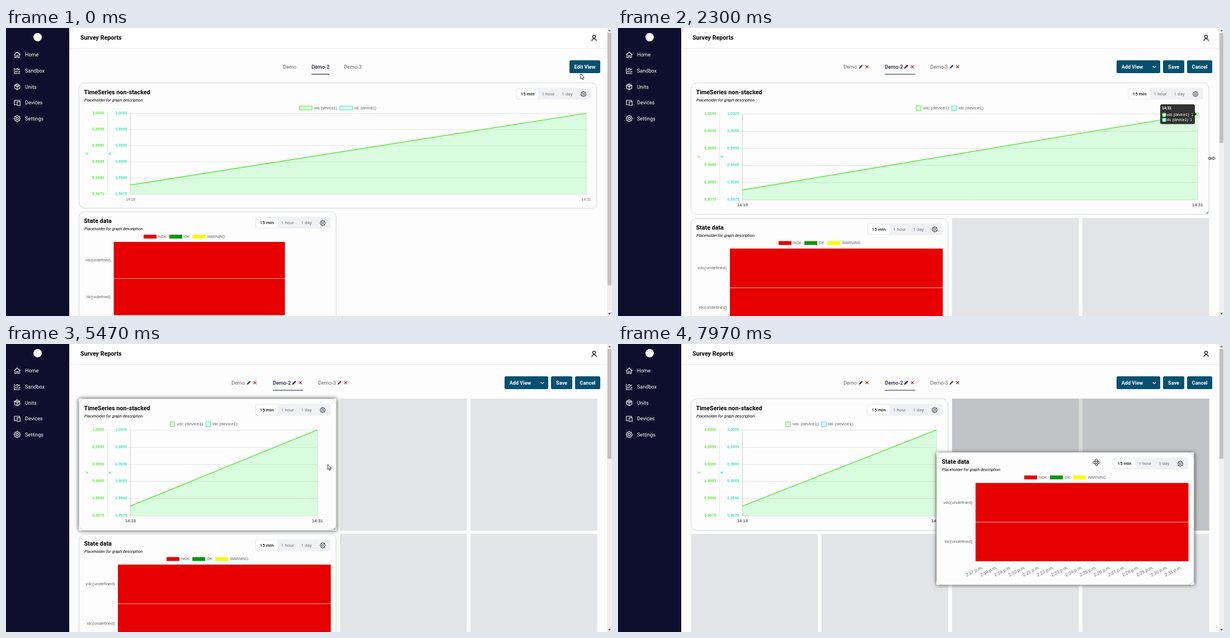
These frames come from a looping animation (1083x517 px, 8 s). An HTML page with a canvas:

```html
<!DOCTYPE html>
<html lang="en">
<head>
<meta charset="utf-8">
<title>Dashboard editing</title>
<style>
  html, body { margin: 0; width: 100%; height: 100%; overflow: hidden; background: #fdfdfd; }
  canvas { display: block; }
</style>
</head>
<body>
<canvas id="stage" width="1083" height="517"></canvas>
<script>
const c = document.getElementById('stage').getContext('2d');
const LOOP = 8000, EDIT = 800, LOAD = 905, HOVER = 1750;
const GRAB = 3450, RELEASE = 5250, LIFT = 6850;
const UI = 'Roboto, sans-serif', CHART = '"Liberation Sans", Arial, sans-serif';
const NAVY = '#0e0f2c', BLUE = '#07506f', PAGE = '#fdfdfd';
const GREEN = '#6ce552', TEAL = '#4de0c6', RED = '#e60000';
const COL = 233.2, ROW = 243, LEFT = 130.5, TOP = 98.5;

const clamp = v => Math.max(0, Math.min(1, v));
const mix = (a, b, u) => a + (b - a) * u;
const smooth = u => { u = clamp(u); return u * u * (3 - 2 * u); };
const ramp = (t, a, b) => smooth((t - a) / (b - a));
const outQuart = u => 1 - (1 - clamp(u)) ** 4;

function text(s, x, y, size, color, { weight = '', font = UI, align = 'left' } = {}) {
  c.font = `${weight} ${size}px ${font}`;
  c.fillStyle = color;
  c.textAlign = align;
  c.textBaseline = 'middle';
  c.fillText(s, x, y);
}
function box(x, y, w, h, fill, r = 0, stroke) {
  c.beginPath();
  c.roundRect(x, y, w, h, r);
  if (fill) { c.fillStyle = fill; c.fill(); }
  if (stroke) { c.strokeStyle = stroke; c.lineWidth = 1; c.stroke(); }
}
function line(color, width, ...p) {
  c.beginPath();
  for (let i = 0; i < p.length; i += 2) c.lineTo(p[i], p[i + 1]);
  c.strokeStyle = color;
  c.lineWidth = width;
  c.stroke();
}
function shape(d, x, y, stroke, fill, width = 1.2) {
  c.save();
  c.translate(x, y);
  const p = new Path2D(d);
  if (fill) { c.fillStyle = fill; c.fill(p); }
  if (stroke) { c.strokeStyle = stroke; c.lineWidth = width; c.stroke(p); }
  c.restore();
}
function gear(x, y, r, color) {
  c.beginPath();
  for (let i = 0; i <= 48; i++) {
    const a = i / 48 * 2 * Math.PI, q = r * (0.9 + 0.12 * Math.cos(8 * a));
    c.lineTo(x + q * Math.cos(a), y + q * Math.sin(a));
  }
  c.moveTo(x + r * 0.38, y);
  c.arc(x, y, r * 0.38, 0, 7);
  c.strokeStyle = color;
  c.lineWidth = 1.1;
  c.stroke();
}

const ICONS = {
  Home: 'M-5.5 0L0-5L5.5 0M-4-1V5H-1.3V1.5H1.3V5H4V-1',
  Sandbox: 'M-5-5V5H5.5M-2.5 3V0M0 3V-1M2.5 3V1M4.5 3V0M-3-2L0-4L2-1.5L5-3',
  Units: 'M0-5.3L4.7-2.7V2.7L0 5.3L-4.7 2.7V-2.7ZM-4.7-2.7L0 0L4.7-2.7M0 0V5.3M-2.4-4L2.4-1.3',
  Devices: 'M-1 3.5H-5V-4.5H4V-2.5M0-2H5.3V4.7H0Z',
  Settings: ''
};

function frame(edit) {
  box(0, 0, 1083, 517, PAGE);
  box(113, 0, 961, 36, '#fff');
  line('#e9e9ef', 1, 113, 36.5, 1074, 36.5);
  text('Survey Reports', 133, 17.5, 10.7, '#000', { weight: 'bold' });
  shape('M-3.8 5.5V4.2Q-3.8 1.3 0 1.3Q3.8 1.3 3.8 4.2V5.5M2.5-2.6A2.5 2.5 0 1 1-2.5-2.6A2.5 2.5 0 1 1 2.5-2.6', 1051, 18, '#111', null, 1.3);

  box(0, 0, 113, 517, NAVY);
  c.beginPath(); c.arc(56.5, 16.5, 7.5, 0, 7); c.fillStyle = '#fff'; c.fill();
  Object.entries(ICONS).forEach(([name, d], i) => {
    const y = 48 + i * 28.75;
    text(name, 34, y + 0.5, 9.05, '#fff');
    if (d) shape(d, 20, y, '#fff', null, 1.1); else gear(20, y - 0.5, 5.5, '#fff');
  });

  box(1074, 0, 9, 517, '#f1f1f1');
  box(1075, 9, 7, edit ? 197 : 453, '#c1c1c1');
  shape('M-2.5 1.5L0-1.5L2.5 1.5Z', 1078.5, 4.5, null, '#777');
  shape('M-2.5-1.5L0 1.5L2.5-1.5Z', 1078.5, 513, null, '#555');
}

function button(label, x, w, dark, tx = x + w / 2) {
  box(x, 58, w, 23, dark ? NAVY : BLUE, 2.5);
  text(label, tx, 70, 9.1, '#fff', { weight: 'bold', align: 'center' });
}
function menu(edit, m) {
  const xs = edit ? [403, 477, 558] : [495, 546, 604];
  ['Demo', 'Demo-2', 'Demo-3'].forEach((name, i) => {
    const on = i === 1, x = xs[i], ink = on ? '#1b1b4b' : '#666';
    text(name, x, 70, 9.1, ink, { weight: on ? '500' : '' });
    if (!edit) return;
    const px = x + (i ? 38 : 31);
    shape('M-3.5 3.5L-3 1.2L1.7-3.5L3.5-1.7L-1.2 3Z', px, 69.5, null, on ? '#1b1b4b' : '#444');
    shape('M-2.5-2.5L2.5 2.5M2.5-2.5L-2.5 2.5', px + 11, 69.5, '#d8232f', null, 1.2);
  });
  line('#1b1b4b', 1.2, xs[1], 83, xs[1] + (edit ? 54 : 32), 83);
  const over = (x, w) => m.x > x && m.x < x + w && m.y > 58 && m.y < 81;
  if (!edit) return button('Edit View', 1007, 55, over(1007, 55));
  button('Add View', 891, 78, false, 919);
  shape('M-2.8-1.4L0 1.4L2.8-1.4', 958.5, 70, '#fff', null, 1.3);
  button('Save', 974, 38, over(974, 38));
  button('Cancel', 1017, 45, over(1017, 45));
}

function card(x, y, w, h, title, lifted) {
  c.save();
  if (lifted) { c.shadowColor = 'rgba(0,0,0,.75)'; c.shadowBlur = 7; }
  box(x - 0.5, y - 0.5, w + 1, h + 1, PAGE);
  c.restore();
  box(x, y, w, h, PAGE, 10, '#d3d5da');
  text(title, x + 9, y + 17, 10.75, '#000', { weight: 'bold' });
  text('Placeholder for graph description', x + 9.5, y + 31, 7.25, '#000', { weight: 'italic' });
  const r = x + w, ty = y + 20;
  box(r - 145, ty - 11, 135, 21, '#eff1f4', 4);
  box(r - 143, ty - 9, 38, 17, '#fff', 3);
  const mid = { align: 'center' };
  text('15 min', r - 124, ty, 8.1, '#111', { weight: '500', align: 'center' });
  text('1 hour', r - 87, ty, 8.1, '#6b7280', mid);
  text('1 day', r - 53, ty, 8.1, '#6b7280', mid);
  gear(r - 24, ty, 4.7, '#555b66');
}

function legend(cx, y, items, bw, bh, size) {
  c.font = `${size}px ${CHART}`;
  const widths = items.map(i => bw + 3.3 + c.measureText(i[0]).width);
  let x = cx - (widths.reduce((a, b) => a + b) + 5 * (items.length - 1)) / 2;
  items.forEach(([name, fill, edge], i) => {
    box(x, y - bh / 2, bw, bh, fill, 0, edge);
    text(name, x + bw + 3.3, y + 0.3, size, '#666', { font: CHART });
    x += widths[i] + 5;
  });
}

function upright(s, x, y, color) {
  c.save();
  c.translate(x, y);
  c.rotate(-Math.PI / 2);
  text(s, 0, 0, 6.9, color, { weight: 'bold', font: CHART, align: 'center' });
  c.restore();
}

// Line chart; r is the right edge of its drawing area.
function series(r, edit, compact, grow) {
  const top = compact ? 154 : 153, h = edit ? 154 : 145, base = top + h;
  const x0 = 222, x1 = r - (compact ? 10.4 : 9);
  const names = [['vdc (device1)', '#d8fbd5', GREEN], ['idc (device1)', '#d9fbf5', TEAL]];
  if (compact) legend((140 + r) / 2, 144, names, 8.5, 8.5, 7.9);
  else legend((140 + r) / 2, 143.5, names, 23, 7, 6.9);

  for (let i = 0; i < 6; i++) {
    const y = Math.round(top + h * i / 5) + 0.5, s = (1 - i * 0.0005).toFixed(4).replace('.', ',');
    line('#e3e3e6', 1, 218, y, x1, y);
    line('#e8ece8', 1, 177, y, 181, y);
    text(s, 175.3, y - 0.5, 6.9, GREEN, { weight: 'bold', font: CHART, align: 'right' });
    text(s, 216.3, y - 0.5, 6.9, TEAL, { weight: 'bold', font: CHART, align: 'right' });
  }
  line('#e6ebe6', 1, 181.5, top, 181.5, base);
  line('#cfd3d3', 1, 222.5, top, 222.5, base);
  line('#dfe2e2', 1, x1, top, x1, base);
  upright('V', 145.5, top + h / 2, GREEN);
  upright('A', 186.5, top + h / 2, TEAL);

  const ya = base - h * 0.111 * grow, yb = base - h * grow;
  c.beginPath();
  c.moveTo(x0, base); c.lineTo(x0, ya); c.lineTo(x1, yb); c.lineTo(x1, base);
  c.fillStyle = 'rgba(100,245,125,.24)';
  c.fill();
  line(GREEN, 1.6, x0, ya, x1, yb);
  const o = { font: CHART, align: 'center' }, size = compact ? 7.8 : 6.8, ink = compact ? '#222' : '#666';
  text('14:16', 222.5, base + 10.3, size, ink, o);
  text('14:31', x1, base + 10.3, size, ink, o);
}

function states(x, y, edit, grow) {
  const bx = x + (edit ? 69.5 : 62), by = y + (edit ? 54.5 : 54);
  const w = edit ? 380.5 : 306, h = edit ? 140.5 : 131.5, size = edit ? 7.9 : 6.8;
  legend(edit ? x + 229.5 : x + 188.5, y + 44.5,
    [['NOK', RED], ['OK', '#0b960b'], ['WARNING', '#fafa0a']], 23, 7, 6.8);
  if (edit) {
    line('#ebebed', 1, bx, by, bx + w, by);
    for (let i = 0; i < 15; i++) {
      const gx = bx + 11 + i * 25.4;
      line('#ebebed', 1, gx, by, gx, by + h + 4);
      c.save();
      c.translate(gx + 1.5, by + h + 10.5);
      c.rotate(-0.475);
      text(`2:${17 + i} p.m.`, 0, 0, 7.9, '#666', { font: CHART, align: 'right' });
      c.restore();
    }
  }
  box(bx, by, w * grow, h, RED);
  line('#f6b5b5', 1, bx, by + h / 2, bx + w * grow, by + h / 2);
  ['vdc(undefined)', 'idc(undefined)'].forEach((s, i) =>
    text(s, bx - 5.5, by + h * (0.25 + i / 2), size, '#666', { font: CHART, align: 'right' }));
}

function pointTip(alpha) {
  if (alpha <= 0) return;
  c.save();
  c.globalAlpha = alpha;
  c.beginPath(); c.arc(1035, 154.5, 2.4, 0, 7);
  c.fillStyle = '#d8fbd5'; c.fill(); c.strokeStyle = GREEN; c.lineWidth = 1; c.stroke();
  box(969, 137, 62, 35.5, 'rgba(0,0,0,.8)', 3);
  shape('M0-3L3.5 0L0 3Z', 1031, 154.5, null, 'rgba(0,0,0,.8)');
  text('14:31', 972, 144, 6.8, '#fff', { weight: 'bold', font: CHART });
  [['vdc', GREEN, '#d8fbd5'], ['idc', TEAL, '#d9fbf5']].forEach(([s, edge, fill], i) => {
    box(973, 153 + i * 9, 6, 6, fill, 0, edge);
    text(s + ' (device1): 1', 980.3, 156 + i * 9, 6.75, '#fff', { font: CHART });
  });
  c.restore();
}
function barTip(alpha) {
  if (alpha <= 0) return;
  c.save();
  c.globalAlpha = alpha;
  box(438, 423, 139, 15, 'rgba(0,0,0,.8)', 3);
  shape('M0-3L3.5 0L0 3Z', 577, 430.5, null, 'rgba(0,0,0,.8)');
  box(441.5, 427.5, 6, 6, RED, 0, '#fff');
  text('NOK: 14:16 (15-11-24) - 14:31 (15-11-24)', 449, 430.7, 6.8, '#fff', { font: CHART });
  c.restore();
}

// Pointer stops: time, x, y
const STOPS = [[0, 1027, 82], [450, 1036, 72], [900, 1036, 72], [1300, 1038, 78], [1450, 1038, 78],
  [1850, 1030, 152], [2250, 1061, 234], [2900, 1062, 232], [3350, 1060, 230]];
const LATER = [[5300, 577, 222], [5470, 575, 216], [5950, 520, 425], [6300, 450, 420], [6630, 411.5, 355], [6800, 415, 358]];
function follow(stops, t) {
  const i = stops.findIndex(s => s[0] > t);
  if (i < 1) { const s = i ? stops[stops.length - 1] : stops[0]; return { x: s[1], y: s[2] }; }
  const [a, b] = [stops[i - 1], stops[i]], u = ramp(t, a[0], b[0]);
  return { x: mix(a[1], b[1], u), y: mix(a[2], b[2], u) };
}
const pull = t => ramp(t, GRAB, GRAB + 1364);
const lift = t => ramp(t, LIFT, 7950);
function pointer(t) {
  if (t < GRAB) return follow(STOPS, t);
  if (t < 5200) return { x: mix(1060, 577, pull(t)), y: mix(230, 222, clamp((t - GRAB) / 520)) };
  if (t < LIFT) return follow(LATER, t);
  return { x: mix(415, 855, lift(t)), y: mix(358, 212.5, lift(t)) };
}
function cursor(t, { x, y }) {
  if (t >= 2150 && t < 5300) {
    shape('M-6.5 0L-3-3V-1H3V-3L6.5 0L3 3V1H-3V3Z', x, y, '#222', '#fff', 0.9);
  } else if (t >= LIFT) {
    for (let i = 0; i < 4; i++) {
      c.save(); c.translate(x, y); c.rotate(i * Math.PI / 2);
      shape('M-1-1V-3.5H-2.7L0-6.5L2.7-3.5H1V-1', 0, 0, '#222', '#fff', 0.9);
      c.restore();
    }
  } else if (t > 250 && t < 1600 && y < 81) {
    shape('M-1 0Q0-1.5 1 0V4L5 5Q6 5 5.7 7L4.7 11H-1L-4 7Q-4.3 5.5-3 5.8L-1 7.3Z', x, y, '#222', '#fff', 0.9);
  } else {
    shape('M0 0V9.5L2.1 7.6L3.6 10.8L5 10.1L3.6 7H6.4Z', x, y, '#222', '#fff', 0.9);
  }
}

const cardRight = t => t < RELEASE ? mix(1056, 577, pull(t - 125)) : mix(577, 590, ramp(t, RELEASE, RELEASE + 200));

function cells() {
  for (let i = 0; i < 8; i++)
    box(130.5 + i % 4 * COL, 98 + (i >> 2) * ROW, 226.5, 237, '#e2e4e8');
}
function slot(col, row, span) {
  box(130.5 + col * COL, 98 + row * ROW, span * COL - 6.5, 237, 'rgba(0,0,0,.145)');
}

function seriesCard(t, edit) {
  const right = cardRight(t), pulling = t > GRAB && t < 5600;
  const area = cardRight(t - 500) - 10, inner = right - 10;
  const h = edit ? 236 : 225, grow = edit ? outQuart((t - LOAD) / 1000) : 1;
  card(LEFT, TOP, right - LEFT, h, 'TimeSeries non-stacked', pulling);
  const spill = area - inner;
  c.save();
  if (spill > 1) { c.beginPath(); c.rect(139, 135, inner - 139, 181.5); c.clip(); }
  series(area, edit, t >= HOVER, grow);
  c.restore();
  if (spill > 1) {
    const track = inner - 161;
    box(140, 316.5, inner - 140, 8.5, '#f1f1f1');
    box(150, 317.5, track * (1 - 0.44 * spill / 906 ), 6.5, '#c1c1c1');
    shape('M1.3-2.2L-1.3 0L1.3 2.2Z', 145, 320.8, null, '#777');
    shape('M-1.3-2.2L1.3 0L-1.3 2.2Z', inner - 5, 320.8, null, '#333');
  }
  if (t > HOVER && t < 5600)
    shape('M0 0V-5L-5 0Z', right - 1, 333.5, null, '#aaa');
}

function stateCard(t, edit) {
  const u = lift(t), x = LEFT + 439 * u, y = (edit ? 341.5 : 330) - 146.5 * u;
  card(x, y, 459.5, edit ? 237 : 225, 'State data', t > LIFT);
  states(x, y, edit, edit ? outQuart((t - LOAD) / 1000) : 1);
}

function draw(t) {
  const edit = t >= EDIT, m = pointer(t);
  frame(edit);
  menu(edit, m);
  if (edit) {
    cells();
    if (t > GRAB && t < RELEASE + 200) slot(0, 0, Math.round((cardRight(t) - LEFT) / COL));
    if (t > LIFT) {
      const col = Math.min(2, Math.round(439 * lift(t) / COL));
      slot(col, col === 2 ? 0 : 1, 2);
    } else {
      box(130, 341, 461, 176, PAGE);
    }
  }
  seriesCard(t, edit);
  stateCard(t, edit);
  pointTip(Math.min(clamp((t - HOVER) / 200), clamp((2700 - t) / 200)));
  barTip(Math.min(clamp((t - 5880) / 200), clamp((6740 - t) / 200)));
  cursor(t, m);
}

function tick() {
  draw(performance.now() % LOOP);
  requestAnimationFrame(tick);
}
tick();
</script>
</body>
</html>
```
